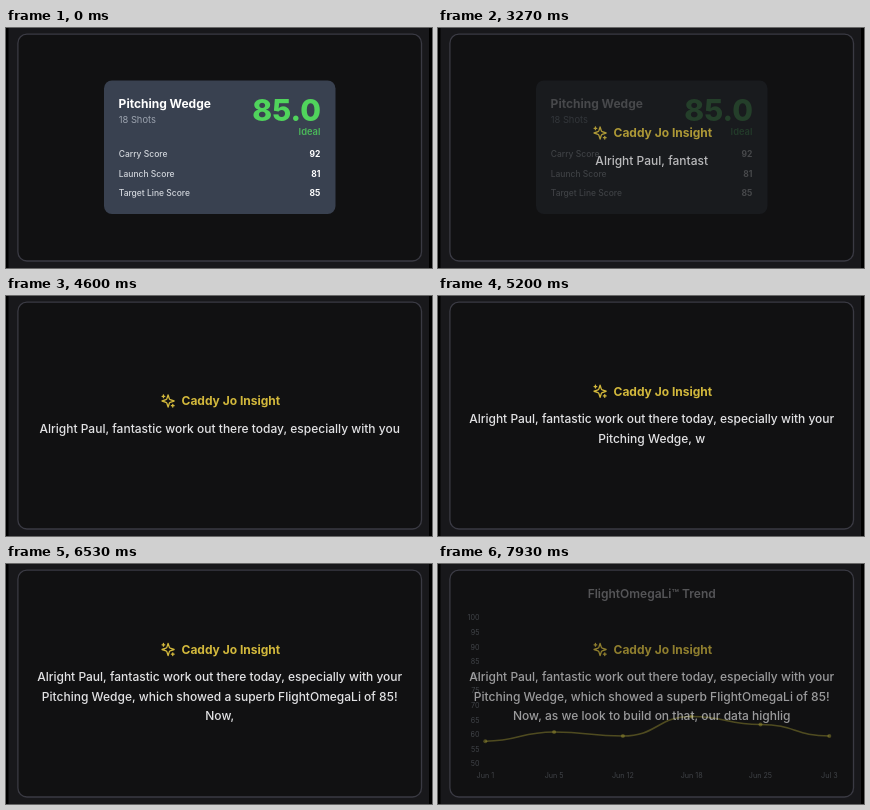
An HTML page with a canvas for the animation above (8000 ms loop, 426x240 px).

```html
<!DOCTYPE html>
<html lang="en">
<head>
<meta charset="utf-8">
<title>Shot insight</title>
<style>
  html, body { margin: 0; width: 100%; height: 100%; overflow: hidden; background: #000; }
  canvas { display: block; width: 100vw; height: 100vh; }
</style>
</head>
<body>
<canvas id="stage"></canvas>
<script>
const W = 426, H = 240, LOOP = 8000, MID = 213.7;
const canvas = document.getElementById('stage');
const ctx = canvas.getContext('2d');

const LINES = [
  'Alright Paul, fantastic work out there today, especially with your ',
  'Pitching Wedge, which showed a superb FlightOmegaLi of 85! ',
  'Now, as we look to build on that, our data highlights'
];
// [time in ms, characters typed]
const TYPING = [[2630, 0], [3270, 21.4], [4130, 50.4], [5200, 84.4], [6530, 130.4], [8000, 178.8]];
const SPARKLES = new Path2D(
  'm12 3-1.912 5.813a2 2 0 0 1-1.275 1.275L3 12l5.813 1.912a2 2 0 0 1 1.275 1.275L12 21' +
  'l1.912-5.813a2 2 0 0 1 1.275-1.275L21 12l-5.813-1.912a2 2 0 0 1-1.275-1.275L12 3Z' +
  'M5 3v4M19 17v4M3 5h4M17 19h4');
const TREND = [['Jun 1', 177.2], ['Jun 5', 168], ['Jun 12', 172], ['Jun 18', 152.5], ['Jun 25', 160.5], ['Jul 3', 172]];

// cubic-bezier(.4, 0, .2, 1)
function ease(p) {
  if (p <= 0) return 0;
  if (p >= 1) return 1;
  let lo = 0, hi = 1, u = 0.5;
  for (let i = 0; i < 20; i++) {
    u = (lo + hi) / 2;
    const x = 1.2 * u * (1 - u) ** 2 + 0.6 * u * u * (1 - u) + u ** 3;
    if (x < p) lo = u; else hi = u;
  }
  return 3 * u * u * (1 - u) + u ** 3;
}

const fade = (t, start) => ease((t - start) / 1000);

function typedCount(t) {
  for (let i = 1; i < TYPING.length; i++) {
    const [t0, n0] = TYPING[i - 1], [t1, n1] = TYPING[i];
    if (t <= t1) return Math.max(0, Math.floor(n0 + (n1 - n0) * (t - t0) / (t1 - t0)));
  }
  return 0;
}

function text(str, x, y, size, weight, color, align = 'left') {
  ctx.font = `${weight} ${size}px Inter, sans-serif`;
  ctx.fillStyle = color;
  ctx.textAlign = align;
  ctx.fillText(str, x, y);
}

function roundRect(x, y, w, h, r) {
  ctx.beginPath();
  ctx.roundRect(x, y, w, h, r);
}

function layer(alpha, draw) {
  if (alpha <= 0) return;
  ctx.save();
  ctx.globalAlpha = alpha;
  draw();
  ctx.restore();
}

function drawPanel() {
  ctx.fillStyle = '#000';
  ctx.fillRect(0, 0, W, H);
  ctx.fillStyle = '#18181b';
  ctx.fillRect(2.5, 0, 420.5, H);
  roundRect(11.9, 6.2, 403.6, 226.8, 9);
  ctx.fillStyle = '#111112';
  ctx.fill();
  ctx.strokeStyle = '#3a3a43';
  ctx.lineWidth = 1.33;
  ctx.stroke();
}

function drawCard() {
  roundRect(98, 52.5, 231.5, 133.5, 8);
  ctx.fillStyle = '#394150';
  ctx.fill();
  text('Pitching Wedge', 112.6, 80.4, 12, 700, '#fff');
  text('18 Shots', 112.7, 94.8, 9.33, 400, '#9ca3af');
  text('85.0', 315, 92.6, 30, 800, '#50d45c', 'right');
  text('Ideal', 314.4, 106.8, 9.33, 600, '#4bb85a', 'right');
  [['Carry Score', 92], ['Launch Score', 81], ['Target Line Score', 85]].forEach(([label, value], i) => {
    const y = 129.4 + i * 19.2;
    text(label, 112.7, y, 8.5, 500, '#d1d5db');
    text(value, 314.4, y, 8.5, 700, '#fff', 'right');
  });
}

function drawInsight(count) {
  const rows = [];
  for (const line of LINES) {
    if (count > 0) rows.push(line.slice(0, count).trimEnd());
    count -= line.length;
  }
  const lift = Math.max(0, rows.length - 1) * 9.75;

  ctx.save();
  ctx.translate(154.1, 97 - lift);
  ctx.scale(2 / 3, 2 / 3);
  ctx.strokeStyle = '#d2b83c';
  ctx.lineWidth = 2;
  ctx.lineCap = ctx.lineJoin = 'round';
  ctx.stroke(SPARKLES);
  ctx.restore();

  text('Caddy Jo Insight', 175.5, 109.3 - lift, 12, 700, '#d2b83c');
  rows.forEach((row, i) => text(row, MID, 136.9 - lift + i * 19.5, 12, 500, '#e2e2e4', 'center'));
}

function drawTrend() {
  text('FlightOmegaLi™ Trend', MID, 34.3, 12, 600, '#d8dade', 'center');
  for (let i = 0; i <= 10; i++) {
    text(100 - i * 5, 41.5, 56.4 + i * 14.6, 7.2, 400, '#9ca3af', 'right');
  }
  const pts = TREND.map(([, y], i) => [47.3 + i * 68.8, y]);
  ctx.strokeStyle = ctx.fillStyle = '#c6bd3c';
  ctx.lineWidth = 1.6;
  ctx.beginPath();
  ctx.moveTo(...pts[0]);
  for (let i = 1; i < pts.length; i++) {
    const [x0, y0] = pts[i - 1], [x1, y1] = pts[i], mid = (x0 + x1) / 2;
    ctx.bezierCurveTo(mid, y0, mid, y1, x1, y1);
  }
  ctx.stroke();
  for (const [x, y] of pts) {
    ctx.beginPath();
    ctx.arc(x, y, 2, 0, Math.PI * 2);
    ctx.fill();
  }
  TREND.forEach(([label], i) => text(label, pts[i][0], 213.8, 7.2, 400, '#9ca3af', 'center'));
}

function frame(now) {
  const t = now % LOOP;
  const dpr = window.devicePixelRatio || 1;
  const w = Math.round(innerWidth * dpr), h = Math.round(innerHeight * dpr);
  if (canvas.width !== w || canvas.height !== h) {
    canvas.width = w;
    canvas.height = h;
  }
  ctx.setTransform(w / W, 0, 0, h / H, 0, 0);

  const insight = fade(t, 2750), trend = fade(t, 7640);
  drawPanel();
  layer(1 - insight, drawCard);
  layer(trend, drawTrend);
  layer(insight * (1 - trend), () => drawInsight(typedCount(t)));
  requestAnimationFrame(frame);
}
requestAnimationFrame(frame);
</script>
</body>
</html>
```
